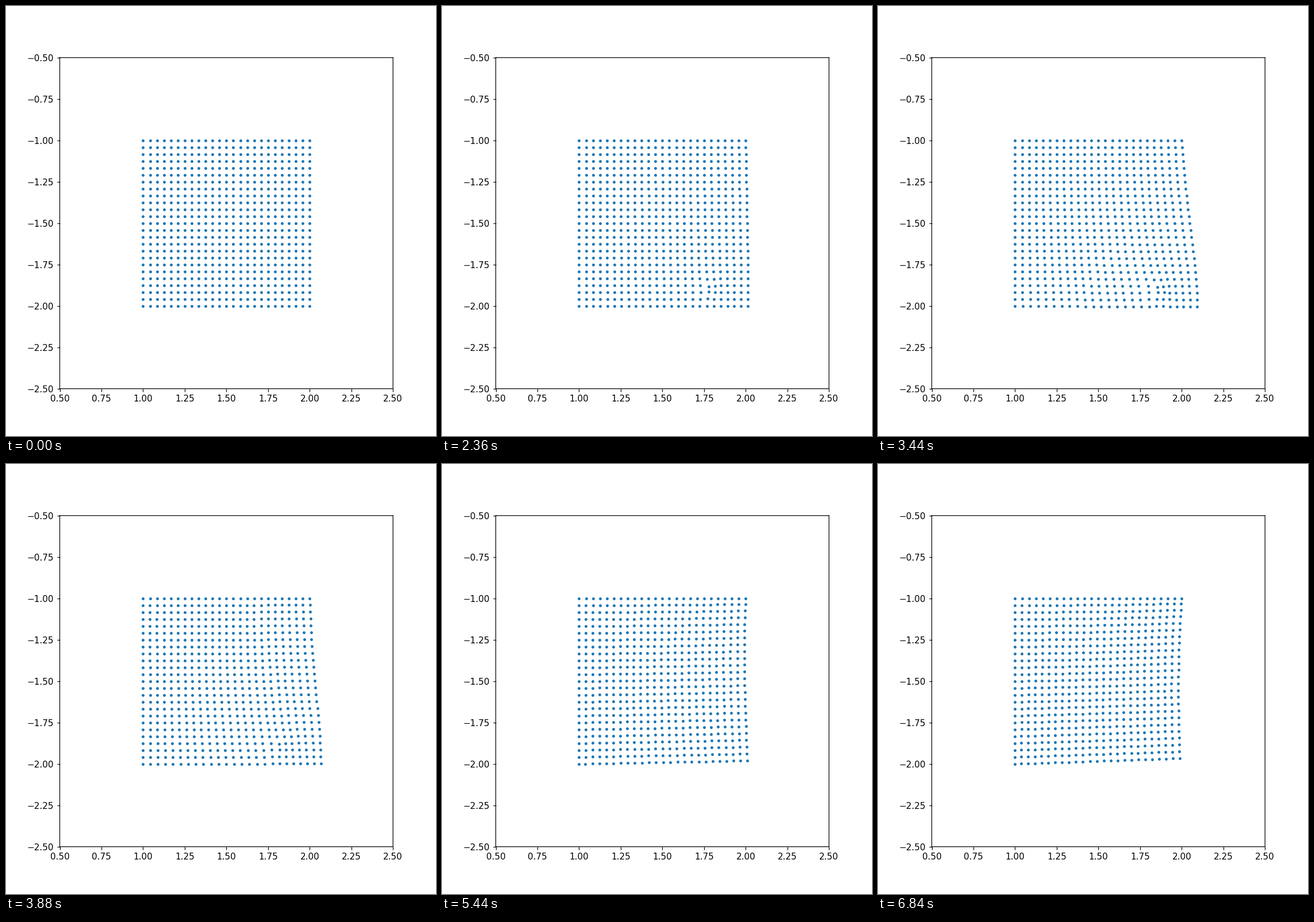
Recreate the animation shown at these times as a matplotlib script. Size 748 by 748 pixels, loop 6.88 s.

```python
import numpy as np
import matplotlib.pyplot as plt
from matplotlib.animation import FuncAnimation

SIZE, DPI = 748, 110
FRAMES, STEP = 172, 40
N = 25
LOAD_END = 2960  # ms, when the sheet is let go

fig, ax = plt.subplots(figsize=(6.8, 6.8), dpi=DPI)
ax.set_xlim(0.5, 2.5)
ax.set_ylim(-2.5, -0.5)
ax.set_xticks(np.arange(0.5, 2.51, 0.25))
ax.set_yticks(np.arange(-2.5, -0.49, 0.25))
for spine in ax.spines.values():
    spine.set_snap(False)

# pixels per data unit
PX = 0.775 * SIZE / 2
PY = 0.77 * SIZE / 2

# u runs right, v runs down; the sheet is clamped at u = 0 and v = 0
u, v = np.meshgrid(np.linspace(0, 1, N), np.linspace(0, 1, N))
col, row = u * (N - 1), v * (N - 1)
free = (u > 0) & (v > 0)

# all displacement fields are in pixels
free_edge = v + 1.3 * v**3 * (1 - v)
weight = u**4
PULL = 27.5 * np.minimum(1.4 * u, 1) * ((1 - weight) * v**2 + weight * free_edge)
SAG = 4 * u * v * (1 - u * v / 2)
SHRINK = (22.6 * v - 17 * v**2) * u ** (1 - 0.6 * v**2)
LIFT = 10 * v**0.35 * u ** (1 + 1.5 * (1 - v) ** 2)

# local distortion around the loaded point
fall = 1 + ((col - 18.2) ** 2 + (row - 21.45) ** 2) / 1.5
BUMP = 12.5 / fall
PINCH = 5 * (row - 21.7) / fall**2


def positions(t):
    since = max(t - LOAD_END, 0)
    rise = 1 / (1 + np.exp((2796 - t) / 174))
    pull = 1.1 * rise * (1 - (t - 3400) / 7000) ** 4
    bump = np.exp(-((t - 3080) / 540) ** 2 / 2)
    shrink = 1 - np.exp(-since / 900)
    lift = since / (FRAMES * STEP - LOAD_END)

    dx = pull * PULL + bump * BUMP - shrink * SHRINK
    dy = lift * LIFT - pull * SAG + np.sqrt(bump) * PINCH
    return 1 + u + free * dx / PX, -1 - v + free * dy / PY


dots = ax.scatter(u + 1, -1 - v, s=3, color="#1f77b4", linewidths=1.5)


def draw(frame):
    x, y = positions(frame * STEP)
    dots.set_offsets(np.column_stack([x.ravel(), y.ravel()]))
    return dots,


anim = FuncAnimation(fig, draw, frames=FRAMES, interval=STEP,
                     repeat=True, repeat_delay=0)
plt.show()
```
